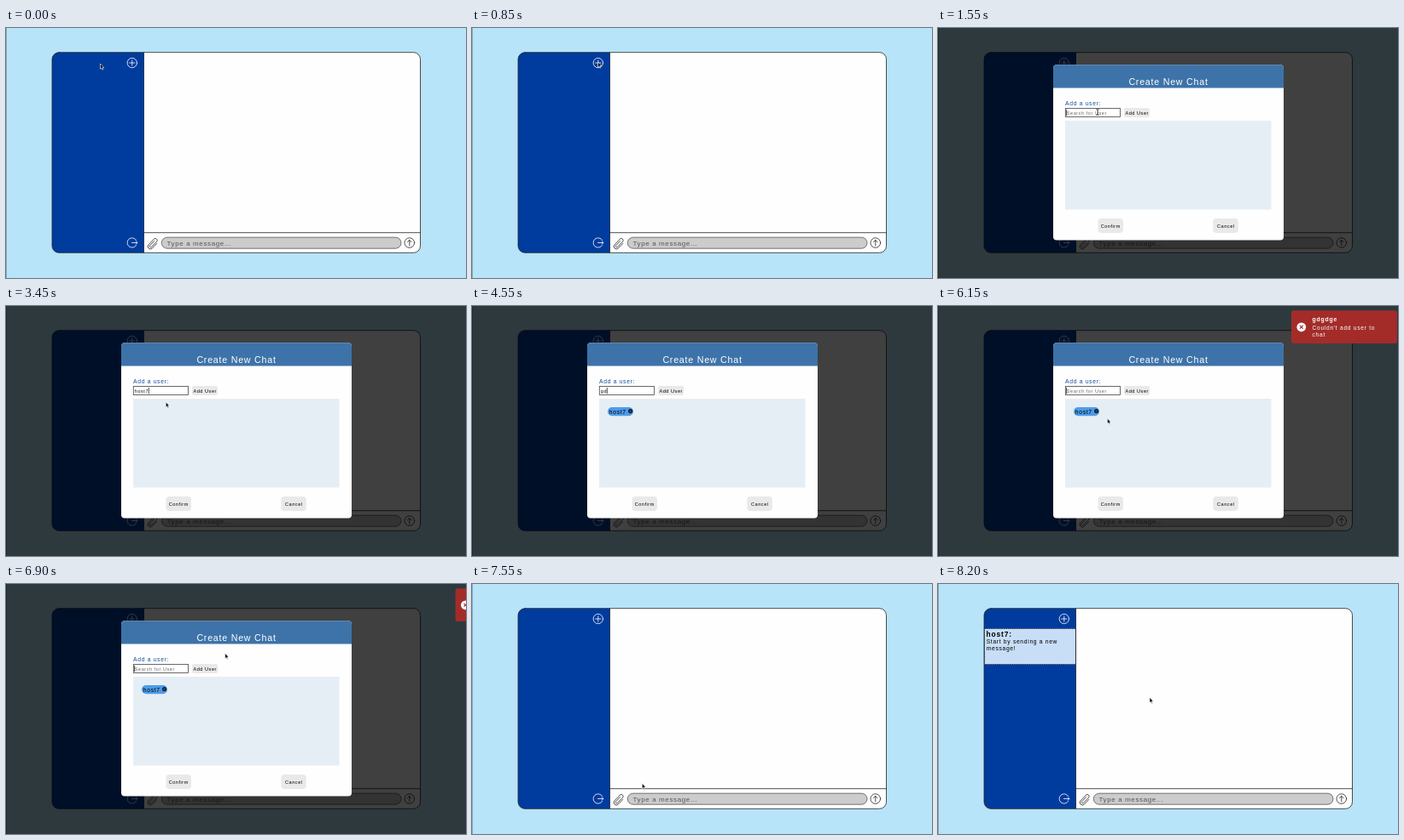
An HTML page for the animation above (8250 ms loop, 539 by 294 pixels).

```html
<!DOCTYPE html>
<html lang="en">
<head>
<meta charset="utf-8">
<title>Create a chat</title>
<style>
html, body { margin: 0; width: 100%; height: 100%; overflow: hidden; background: #b7e4f9; }
svg { display: block; width: 539px; height: 294px; }
text { font-family: "Liberation Sans", Arial, sans-serif; white-space: pre; }
.small { font-size: 5.5px; letter-spacing: .57px; }
.body { font-size: 6.7px; letter-spacing: .7px; }
.mid { text-anchor: middle; }
.line { fill: none; stroke: #222; stroke-width: .8; stroke-linecap: round; stroke-linejoin: round; }
.white { stroke: #fff; }
</style>
</head>
<body>
<svg viewBox="0 0 539 294">
  <defs>
    <clipPath id="frame"><rect x="54" y="28.7" width="431.5" height="235.6" rx="8"/></clipPath>
    <clipPath id="card"><rect x="135" y="43.3" width="270" height="206.3" rx="4"/></clipPath>
  </defs>
  <rect width="539" height="294" fill="#b7e4f9"/>
  <rect width=".5" height="294" fill="#567"/>

  <g clip-path="url(#frame)">
    <rect x="54" y="28" width="432" height="237" fill="#fefefe"/>
    <rect x="54" y="28" width="107.5" height="237" fill="#003c9e"/>
  </g>
  <g id="chat">
    <rect x="54.4" y="52.5" width="107" height="42" fill="#c8def6" stroke="#222" stroke-width=".7" stroke-dasharray="1.5 1"/>
    <text x="56.5" y="62.3" font-size="8.4" font-weight="bold" letter-spacing=".9">host7:</text>
    <text class="body" x="56.7" y="70.3">Start by sending a new</text>
    <text class="body" x="56.7" y="77.8">message!</text>
  </g>
  <rect class="line" x="54" y="28.7" width="431.5" height="235.6" rx="8"/>
  <path class="line" d="M161.5 29V264M161.5 240.7H485.5"/>
  <g class="line white">
    <circle cx="147.8" cy="41" r="5.7"/>
    <path d="M144.6 41h6.4M147.8 37.8v6.4"/>
    <path d="M152.6 249.4A5.7 5.7 0 1 0 152.6 255.6M147.5 252.5h6.4M152 250.6l2 1.9-2 1.9"/>
  </g>
  <path class="line" d="M173.5 250.6l-4.8 5.1a1.3 1.3 0 0 0 1.9 1.8l5.9-6.2a2.2 2.2 0 0 0-3.2-3.1l-6.2 6.6a3 3 0 0 0 4.3 4.2l5.3-5.6"/>
  <rect x="182.3" y="246.2" width="280.7" height="13" rx="6.5" fill="#ccc" stroke="#555" stroke-width=".8"/>
  <text x="188.5" y="255.7" font-size="8" letter-spacing=".62" fill="#555">Type a message...</text>
  <g class="line">
    <circle cx="472.8" cy="252.6" r="5.8"/>
    <path d="M472.8 256v-6.6M470.4 251.8l2.4-2.4 2.4 2.4"/>
  </g>

  <g id="modal">
    <rect width="539" height="294" fill="#000" fill-opacity=".75"/>
    <g clip-path="url(#card)">
      <rect x="135" y="43" width="270" height="207" fill="#fefefe"/>
      <rect x="135" y="43" width="270" height="27.5" fill="#3d73a9"/>
    </g>
    <text class="mid" x="270" y="66.5" font-size="10.7" letter-spacing=".75" fill="#fff">Create New Chat</text>
    <text x="149" y="90.6" font-size="6.8" letter-spacing=".67" fill="#14509c">Add a user:</text>
    <rect x="149.3" y="94.5" width="64.2" height="10" fill="#fff" stroke="#444" stroke-width=".8"/>
    <text id="field" class="small" x="150.8" y="101.6"></text>
    <path id="caret" class="line" d="M0 96.3v6.6" stroke-width=".6"/>
    <g fill="#e9e9ea">
      <rect x="218" y="94" width="30" height="11" rx="2"/>
      <rect x="187.5" y="224" width="29.5" height="17" rx="4"/>
      <rect x="322.3" y="224" width="29.5" height="17" rx="4"/>
    </g>
    <g class="small mid">
      <text x="233.2" y="101.6">Add User</text>
      <text x="202.3" y="234.6">Confirm</text>
      <text x="337.3" y="234.6">Cancel</text>
    </g>
    <rect x="149" y="109" width="241.5" height="104.5" fill="#e6eef5"/>
    <g id="chip">
      <rect x="159" y="119" width="30" height="10.2" rx="5.1" fill="#4c9be9"/>
      <text class="body" x="160.8" y="126.5">host7</text>
      <circle cx="185.6" cy="123.6" r="2.6" fill="#16222e"/>
      <path d="M184.7 122.7l1.8 1.8m0-1.8l-1.8 1.8" stroke="#4c9be9" stroke-width=".5"/>
    </g>
  </g>

  <g id="toast" fill="#fff">
    <rect x="414" y="5.3" width="124" height="38.8" rx="3" fill="#a32c29"/>
    <circle cx="425.8" cy="24.8" r="5.4"/>
    <path d="M423.9 22.9l3.8 3.8m0-3.8l-3.8 3.8" stroke="#a32c29" stroke-width="1.2"/>
    <text x="438.5" y="17.8" font-size="6.9" font-weight="bold" letter-spacing=".8">gdgdge</text>
    <text class="body" x="438.5" y="28">Couldn't add user to</text>
    <text class="body" x="438.5" y="36">chat</text>
  </g>

  <g id="mouse">
    <path id="arrow" d="M0 0V6.1L1.4 4.9 2.4 7.1 3.4 6.7 2.4 4.5H4.3Z" stroke="#fff" stroke-width=".6"/>
    <path id="beam" class="line" d="M-1.3-3.5Q0-3.5 0-2.5V2.5Q0 3.5-1.3 3.5M1.3-3.5Q0-3.5 0-2.5M0 2.5Q0 3.5 1.3 3.5"/>
  </g>
</svg>
<script>
const LOOP = 8250;
const el = id => document.getElementById(id);
const show = (id, on) => el(id).setAttribute("display", on ? "inline" : "none");
const move = (id, x, y) => el(id).setAttribute("transform", `translate(${x} ${y})`);
const within = (t, a, b) => t >= a && t < b;
const ease = (t, start, length) => {
  const p = Math.min(1, Math.max(0, (t - start) / length));
  return p * p * (3 - 2 * p);
};

// Mouse stops: time, x, y
const stops = [
  [0, 110.5, 42], [300, 124, 27], [650, 147.5, 40], [1000, 147.5, 40],
  [1450, 187, 99], [2950, 187, 99], [3250, 187.3, 113], [3500, 187.3, 113],
  [3800, 232, 100], [4000, 232, 100], [4300, 190, 99], [6050, 190, 113],
  [6350, 222, 186], [6500, 222, 186], [6850, 256.7, 81.5], [6950, 256.7, 81.5],
  [7300, 199.3, 234.5], [7600, 199.3, 234.5], [8100, 248, 133.5], [LOOP, 248, 133.5]
];

// Typed entries: first key, ms per key, time submitted, text
const entries = [[1850, 150, 3900, "host7"], [4350, 120, 5150, "gdgdge"]];

function mouseAt(t) {
  const i = stops.findIndex(s => s[0] > t);
  const [t0, x0, y0] = stops[i - 1], [t1, x1, y1] = stops[i];
  const p = ease(t, t0, t1 - t0);
  return [x0 + (x1 - x0) * p, y0 + (y1 - y0) * p];
}

function draw(t) {
  const open = within(t, 1000, 7400);
  show("modal", open);
  show("chip", t >= 3900);
  show("chat", t >= 7750);

  const entry = entries.find(e => within(t, e[0], e[2]));
  const typed = entry ? entry[3].slice(0, 1 + Math.floor((t - entry[0]) / entry[1])) : "";
  const field = el("field");
  field.textContent = typed || "Search for User";
  field.setAttribute("fill", typed ? "#111" : "#666");
  show("caret", t >= 1450);
  move("caret", 151 + (typed ? field.getComputedTextLength() : -.4), 0);

  show("toast", within(t, 5180, 6960));
  move("toast", 125 * (1 - ease(t, 5180, 200) + ease(t, 6740, 200)), 0);

  const [x, y] = mouseAt(t);
  const overField = open && within(x, 149, 214) && within(y, 94, 105);
  move("mouse", x, y);
  show("mouse", !within(t, 1850, 2950) && !within(t, 4350, 6050));
  show("beam", overField);
  show("arrow", !overField);
}

const begin = performance.now();
function tick() {
  draw((performance.now() - begin) % LOOP);
  requestAnimationFrame(tick);
}
tick();
</script>
</body>
</html>
```
